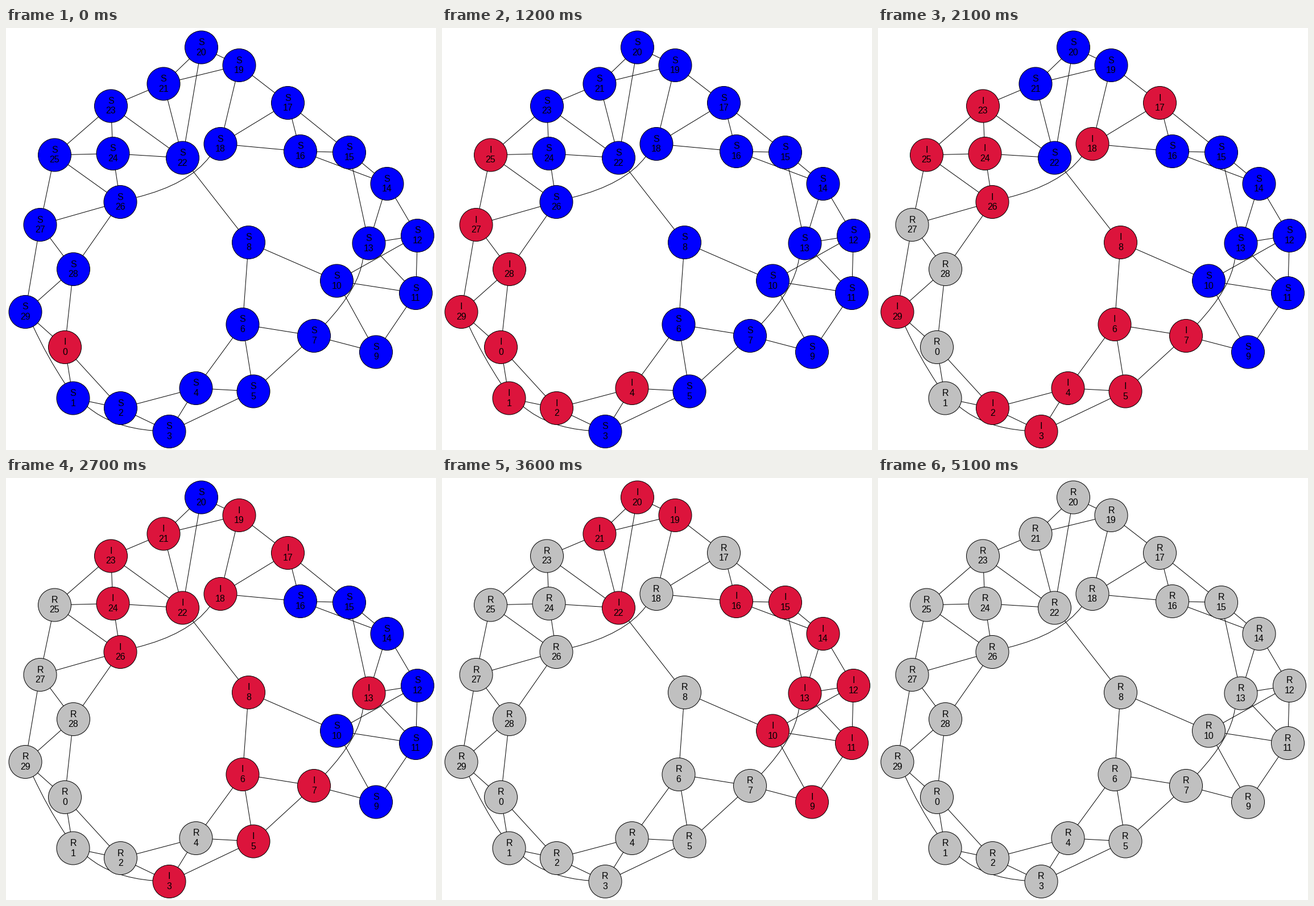
These frames come from a looping animation (756 by 741 pixels, 5.4 s). A matplotlib script:

```python
import matplotlib.pyplot as plt
from matplotlib.animation import FuncAnimation
from matplotlib.patches import Circle, PathPatch
from matplotlib.path import Path

WIDTH, HEIGHT, DPI = 756, 741, 64
PX = 72 / DPI  # points per pixel
RADIUS = 29
STEPS, STEP_MS = 18, 300
SICK_STEPS = 5

POSITIONS = [
    (103, 560), (117.5, 649.5), (201, 667), (286.5, 708), (333.5, 632),
    (434.5, 637.5), (415.5, 520), (541, 540), (426, 376), (650, 568.5),
    (581, 443.5), (720, 465), (723, 364), (637.5, 377.5), (669.5, 273),
    (603, 218), (517, 216), (495, 131), (376.5, 203), (409.5, 65),
    (343, 33.5), (276.5, 97.5), (310, 227.5), (184, 136.5), (187.5, 220),
    (85, 222.5), (200.5, 305), (59.5, 345), (118, 423), (33.5, 498),
]

# Step at which each node catches the infection
INFECTED_AT = [
    0, 2, 3, 5, 4, 6, 5, 7, 6, 11,
    10, 10, 12, 9, 11, 10, 10, 7, 6, 9,
    10, 9, 8, 7, 7, 3, 5, 2, 1, 4,
]

# Edges that bend around a node: start, control, end
CURVES = [
    [(47, 523), (72, 577), (104, 625)],
    [(142, 664), (186, 701), (258, 706.5)],
    [(627, 405), (620, 456), (561, 519)],
    [(229, 297), (321, 274), (357.5, 225.5)],
]

COLORS = {"S": "#0000ff", "I": "#dc143c", "R": "#c0c0c0"}


def ring_edges():
    """Ring lattice with two neighbours per side; a few links are rewired."""
    n = len(POSITIONS)
    edges = {(i, (i + k) % n) for i in range(n) for k in (1, 2)}
    edges -= {(7, 8), (8, 9), (18, 20), (29, 1), (1, 3)}
    return sorted(edges | {(8, 22)})


def state(node, step):
    age = step - INFECTED_AT[node]
    if age < 0:
        return "S"
    return "I" if age < SICK_STEPS else "R"


fig = plt.figure(figsize=(WIDTH / DPI, HEIGHT / DPI), dpi=DPI, facecolor="white")
ax = fig.add_axes([0, 0, 1, 1])
ax.set_xlim(-0.5, WIDTH - 0.5)
ax.set_ylim(HEIGHT - 0.5, -0.5)
ax.axis("off")

for a, b in ring_edges():
    (x0, y0), (x1, y1) = POSITIONS[a], POSITIONS[b]
    ax.plot([x0, x1], [y0, y1], color="black", lw=PX, zorder=1)

for points in CURVES:
    path = Path(points, [Path.MOVETO, Path.CURVE3, Path.CURVE3])
    ax.add_patch(PathPatch(path, fill=False, ec="black", lw=PX, zorder=1))


def add_label(x, y, text):
    return ax.text(x, y, text, family="Liberation Sans", fontsize=16 * PX,
                   color="black", ha="center", va="baseline", zorder=3)


discs, letters = [], []
for i, (x, y) in enumerate(POSITIONS):
    discs.append(ax.add_patch(Circle((x, y), RADIUS, ec="black", lw=PX, zorder=2)))
    letters.append(add_label(x, y - 4, "S"))
    add_label(x, y + 13.5, str(i))


def update(step):
    for i, (disc, letter) in enumerate(zip(discs, letters)):
        s = state(i, step)
        disc.set_facecolor(COLORS[s])
        letter.set_text(s)
    return discs + letters


anim = FuncAnimation(fig, update, frames=STEPS, interval=STEP_MS,
                     repeat=True, repeat_delay=0, blit=False)
plt.show()
```
